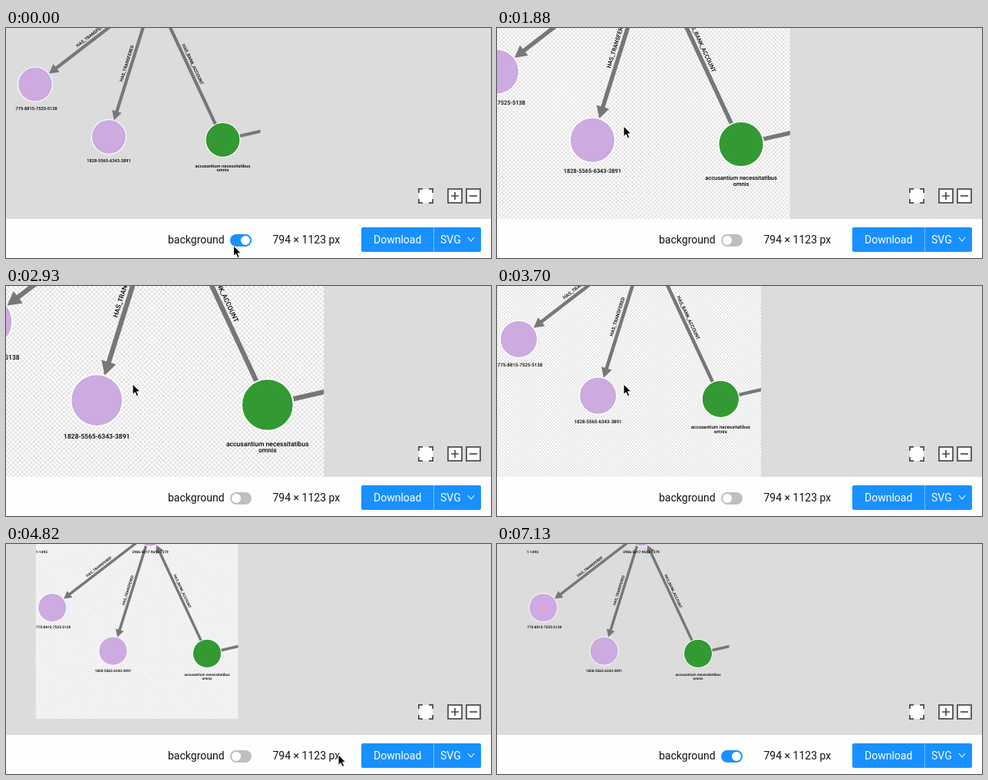
Write an HTML page that moves like this. It is 632 px wide and 300 px high and loops after 7.23 s.

```html
<!DOCTYPE html>
<html lang="en">
<head>
<meta charset="utf-8">
<title>Graph export preview</title>
<style>
html, body { margin: 0; width: 100%; height: 100%; overflow: hidden; background: #dcdcdc; }
svg { display: block; width: 632px; height: 300px; font-family: Roboto, sans-serif; }
#graph text { font-size: 5.72px; font-weight: 500; text-anchor: middle; text-rendering: geometricPrecision; }
.ui { font-size: 14px; fill: #111; }
.light { fill: #fff; }
.icon { fill: none; stroke: #484848; stroke-width: 1.7; }
</style>
</head>
<body>
<svg viewBox="0 0 632 300">
  <defs>
    <clipPath id="page"><rect x="12" y="-203" width="319.5" height="452.3"/></clipPath>
    <pattern id="checks" x="12" y="-203" width="4.024" height="4.024" patternUnits="userSpaceOnUse">
      <rect width="4.024" height="4.024" fill="#fff"/>
      <path d="M0 0h2.012v4.024h2.012v-2.012h-4.024z" fill="#e3e3e3"/>
    </pattern>
  </defs>
  <rect width="632" height="300" fill="#dcdcdc"/>
  <g id="view">
    <rect id="checker" x="12" y="-203" width="319.5" height="452.3" fill="url(#checks)"/>
    <g id="graph" clip-path="url(#page)"></g>
  </g>

  <rect x="538" y="210" width="18" height="18" fill="#fff"/>
  <path class="icon" d="M537.9 215v-5.1h5.1M551 209.9h5.1v5.1M556.1 223v5.1h-5.1M543 228.1h-5.1v-5.1"/>
  <g class="icon">
    <rect x="576" y="210" width="18" height="18" fill="#fff"/>
    <path d="M580 219h10M585 214v10"/>
    <rect x="600" y="210" width="18" height="18" fill="#fff"/>
    <path d="M604 219h10"/>
  </g>

  <rect y="249" width="632" height="51" fill="#fefefe"/>
  <text class="ui" x="211" y="280.5">background</text>
  <rect id="wave" fill="none" stroke="#1890ff"/>
  <rect id="track" x="292" y="269" width="28" height="16" rx="8"/>
  <rect id="knob" y="271" height="12" rx="6" fill="#fff"/>
  <text class="ui" x="347.5" y="280.5">794 × 1123 px</text>
  <path id="save" d="M557 260h-92a2 2 0 0 0-2 2v28a2 2 0 0 0 2 2h92z"/>
  <rect x="557" y="260" width="1" height="32" fill="#7cc0ff"/>
  <path id="format" d="M558 260h59a2 2 0 0 1 2 2v28a2 2 0 0 1-2 2h-59z"/>
  <text class="ui light" x="479" y="280.5">Download</text>
  <text class="ui light" x="566" y="280.5">SVG</text>
  <path d="M601.8 273l4.2 5 4.2-5" fill="none" stroke="#fff" stroke-width="1.1"/>

  <g id="cursor" stroke="#fff" stroke-linejoin="round">
    <path id="arrow" d="M0 0v13.6l3.1-2.9 2.2 5 2.4-1-2.2-4.9h4.3z" fill="#000"/>
    <path id="hand" d="M-1.3 .4C-1.2-1 1.1-1 1.4 .4L2.3 4.6C3 3.6 4.6 3.8 4.8 5C5.6 4.2 7 4.6 7.1 5.7C8 5.2 9 5.8 9 7C9 10 8.6 10.9 7.6 12.6V14.8H.6V13.2C-1 11.6-2.4 9.5-4 7.7C-4.6 6.5-3 5.7-1.9 6.6L-.2 8.1Z"
      fill="#fff" stroke="#000" stroke-width="1.1"/>
    <path id="fingers" d="M2.3 9.5v3M4.3 9.5v3M6.2 9.5v3" stroke="#000" stroke-width=".8"/>
  </g>
</svg>
<script>
const LOOP = 7230, RADIUS = 22;
const PIVOT = [165.5, 127.8];
const el = id => document.getElementById(id);
const set = (id, attrs) => {
  for (const key in attrs) el(id).setAttribute(key, attrs[key]);
};

// Graph in page coordinates at zoom 1
const PURPLE = '#cdaadf', GREEN = '#339933';
const nodes = {
  hub: { x: 192.8, y: -45.9, fill: PURPLE, label: ['2906-5017-9613-7279'] },
  west: { x: 38, y: 73.5, fill: PURPLE, label: ['3775-8815-7525-5138'] },
  south: { x: 134, y: 142, fill: PURPLE, label: ['1828-5565-6343-3891'] },
  bank: { x: 282.5, y: 146, fill: GREEN, label: ['accusantium necessitatibus', 'omnis'] },
  far: { x: 1.3, y: -45.9, fill: PURPLE, label: ['4716-2083-6551-1495'] },
  east: { x: 420, y: 114.4, fill: PURPLE, label: [] }
};
const edges = [
  ['hub', 'west', 'HAS_TRANSFERED'],
  ['hub', 'south', 'HAS_TRANSFERED'],
  ['bank', 'hub', 'HAS_BANK_ACCOUNT'],
  ['bank', 'east', '']
];

function edgeMarkup([from, to, label]) {
  const a = nodes[from], b = nodes[to];
  const dx = b.x - a.x, dy = b.y - a.y, length = Math.hypot(dx, dy);
  const angle = Math.atan2(dy, dx) * 180 / Math.PI;
  const tip = length - RADIUS - .8;
  const flip = dx < 0 ? 180 : 0;
  return `<g transform="translate(${a.x} ${a.y}) rotate(${angle})" fill="#777">
    <path d="M${RADIUS} -2.1H${tip - 12}V-6.6L${tip} 0L${tip - 12} 6.6V2.1H${RADIUS}z"/>
    <text transform="translate(${length / 2}) rotate(${flip})" y="-4.4" fill="#000">${label}</text></g>`;
}

function nodeMarkup({ x, y, fill, label }) {
  const lines = label.map((line, i) =>
    `<text x="${x}" y="${y + (label.length > 1 ? 35.7 : 33.1) + i * 5.75}">${line}</text>`);
  return `<circle cx="${x}" cy="${y}" r="${RADIUS + .5}" fill="${fill}" stroke="#fff" stroke-width="1.2"/>` + lines.join('');
}

el('graph').innerHTML = edges.map(edgeMarkup).join('') + Object.values(nodes).map(nodeMarkup).join('');

// Keys are [time, ...values]; values run straight between keys and hold outside them
function sample(keys, t) {
  const i = keys.findIndex(key => key[0] > t);
  if (i === 0) return keys[0].slice(1);
  if (i < 0) return keys[keys.length - 1].slice(1);
  const a = keys[i - 1], b = keys[i], p = (t - a[0]) / (b[0] - a[0]);
  return a.slice(1).map((v, k) => v + (b[k + 1] - v) * p);
}

const zoomKeys = [
  [1760, 1], [2070, 1.973], [2770, 1.973], [2930, 1.502], [3050, 1.1], [3680, 1.1], [3950, .825]
].map(([t, zoom]) => [t, Math.log(zoom)]);
const pointerKeys = [
  [110, 296.5, 284], [250, 304, 280], [460, 311, 277],
  [1270, 311, 277], [1310, 304, 280.5], [1430, 224.5, 132.5], [1520, 185, 129], [1620, 165, 128],
  [4380, 165, 128], [4500, 250, 178], [4620, 390, 240], [4720, 455, 266], [4800, 440, 274], [4930, 397, 279],
  [5050, 397, 279], [5180, 345, 279], [5300, 311, 277],
  [5660, 311, 277], [5780, 397, 271], [5860, 430, 244], [5950, 480, 258], [6060, 510, 272],
  [6190, 510, 272], [6400, 572, 282], [6640, 586, 302]
];
const saveHover = [[5920, 0], [6080, 1], [6340, 1], [6560, 0]];
const formatHover = [[6350, 0], [6450, .7], [6500, .7], [6660, 0]];
const switchKeys = [[740, 1], [940, 0], [5420, 0], [5600, 1]];
const pressKeys = [[630, 0], [700, 1], [740, 1], [840, 0], [5330, 0], [5390, 1], [5420, 1], [5520, 0]];

const mix = (a, b, p) => `rgb(${a.map((v, i) => Math.round(v + (b[i] - v) * p))})`;
const BLUE = [24, 144, 255], SKY = [64, 169, 255], GREY = [191, 191, 191];
const smooth = p => p * p * (3 - 2 * p);
const inside = (x, y, left, top, right, bottom) => x >= left && x < right && y >= top && y < bottom;

function drawSwitch(t) {
  const on = smooth(sample(switchKeys, t)[0]);
  const press = sample(pressKeys, t)[0];
  const width = 12 + 3.5 * press;
  set('track', { fill: mix(GREY, BLUE, on) });
  set('knob', { x: 294 + on * (24 - width), width });

  const since = t - (t < 3000 ? 740 : 5420);
  const p = Math.min(1, Math.max(0, since / 290));
  const spread = 3 * p;
  set('wave', {
    x: 292 - spread / 2, y: 269 - spread / 2, width: 28 + spread, height: 16 + spread,
    rx: 8 + spread / 2, 'stroke-width': spread, opacity: .2 * (1 - p)
  });
}

function drawPointer(t) {
  const [x, y] = sample(pointerKeys, t);
  const hand = inside(x, y, 292, 269, 320, 283.5) || inside(x, y, 463, 260, 619, 292);
  set('cursor', { transform: `translate(${x} ${y})`, visibility: y > 300 ? 'hidden' : 'visible' });
  set('arrow', { display: hand ? 'none' : 'inline' });
  for (const id of ['hand', 'fingers']) set(id, { display: hand ? 'inline' : 'none' });
}

function draw(t) {
  const zoom = Math.exp(sample(zoomKeys, t)[0]);
  const [px, py] = PIVOT;
  set('view', { transform: `translate(${px * (1 - zoom)} ${py * (1 - zoom)}) scale(${zoom})` });
  set('checker', { visibility: t >= 740 && t < 5420 ? 'visible' : 'hidden' });
  drawSwitch(t);
  set('save', { fill: mix(BLUE, SKY, sample(saveHover, t)[0]) });
  set('format', { fill: mix(BLUE, SKY, sample(formatHover, t)[0]) });
  drawPointer(t);
}

const start = performance.now();
function tick() {
  draw((performance.now() - start) % LOOP);
  requestAnimationFrame(tick);
}
tick();
</script>
</body>
</html>
```
